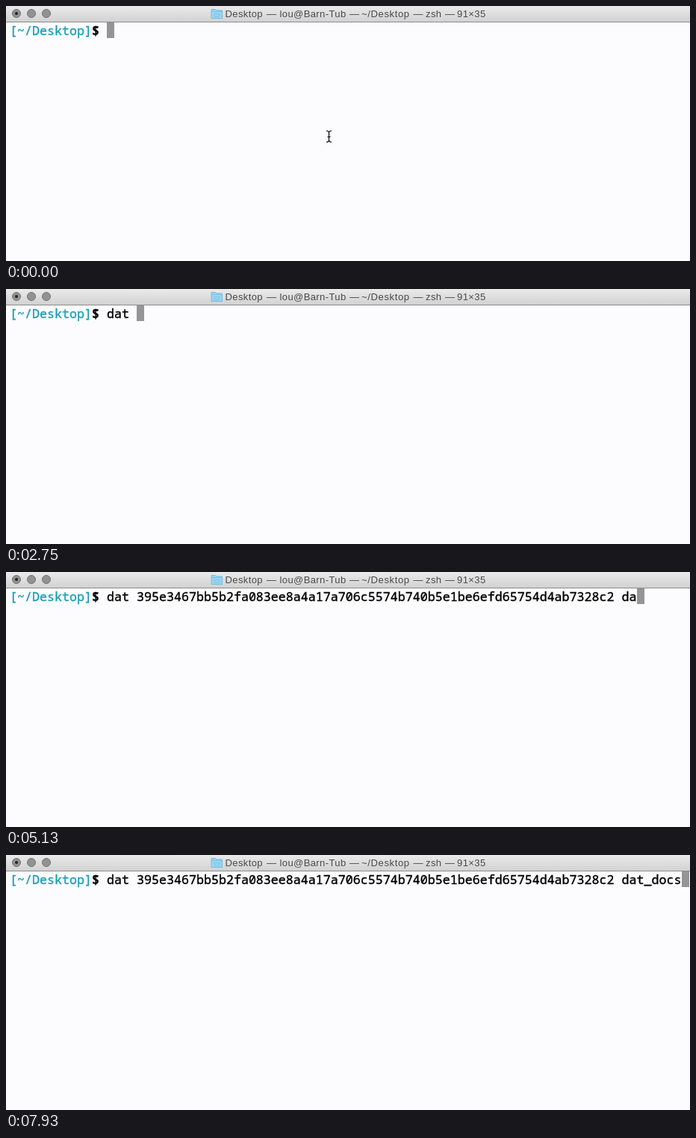
Recreate the animation shown at these times as an HTML page. Size 916 by 342 pixels, loop 8000 ms.

```html
<!DOCTYPE html>
<html lang="en">
<head>
<meta charset="utf-8">
<title>Terminal</title>
<style>
  html, body { margin: 0; width: 100%; height: 100%; overflow: hidden; background: #fcfcfe; }
  svg { display: block; width: 916px; height: 342px; }
  .title { font: 13px "Liberation Sans", Arial, sans-serif; letter-spacing: .4px; fill: #484848; }
  .shell { font: 16.667px "Noto Sans Mono", monospace; white-space: pre; stroke-width: .4; }
  .ink { fill: #000; stroke: #000; }
  .path { fill: #1a9fb6; stroke: #1a9fb6; }
</style>
</head>
<body>
<svg viewBox="0 0 916 342">
  <defs>
    <linearGradient id="bar" x1="0" y1="0" x2="0" y2="1">
      <stop offset="0" stop-color="#eaeaea"/>
      <stop offset="1" stop-color="#d2d2d2"/>
    </linearGradient>
  </defs>
  <rect width="916" height="342" fill="#fcfcfe"/>
  <rect width="916" height="21" fill="url(#bar)"/>
  <rect y="21" width="916" height="1" fill="#8c8c8c"/>

  <g fill="#929292" stroke="#727272">
    <circle cx="14" cy="10" r="5.5"/>
    <circle cx="34" cy="10" r="5.5"/>
    <circle cx="54" cy="10" r="5.5"/>
  </g>
  <circle cx="14" cy="10" r="2" fill="#222"/>

  <path d="M275 16.5V4.5H280.5L282 6H289.500V16.5Z" fill="#9bd6f3" stroke="#72bce0"/>
  <path d="M275.5 7.5H289M279 10.500H286V14H279Z" fill="none" stroke="#7cc3e6"/>

  <g class="title">
    <text x="293.5" y="15">Desktop</text>
    <text x="349" y="15">—</text>
    <text x="366.5" y="15">lou@Barn-Tub</text>
    <text x="460" y="15">—</text>
    <text x="476" y="15" style="letter-spacing:.65px">~/Desktop</text>
    <text x="545.5" y="15">—</text>
    <text x="562" y="15">zsh</text>
    <text x="588" y="15">—</text>
    <text x="604" y="15">91×35</text>
  </g>

  <rect id="caret" y="22" width="10" height="21" fill="#959595"/>
  <g class="shell">
    <text class="path" x="5" y="39">[~/Desktop]</text>
    <text class="ink" x="115" y="39" font-weight="700">$</text>
    <text class="ink" id="typed" x="135" y="39"></text>
  </g>

  <path id="pointer" fill="none" stroke="#000" stroke-width="1.2"
    d="M429 167.5Q432.5 167.5 432.5 170Q432.5 167.5 436 167.5M432.5 169.5V181M429 182.5Q432.5 182.5 432.5 180Q432.5 182.5 436 182.5M430.5 175.5H434.5"/>
</svg>
<script>
  const LOOP = 8000, CELL = 10, START = 135;
  const HASH = "395e3467bb5b2fa083ee8a4a17a706c5574b740b5e1be6efd65754d4ab7328c2";
  // Keystrokes: [time in ms, inserted text]
  const KEYS = [
    [690, "d"], [930, "a"], [1190, "t"], [1430, " "],
    [3030, HASH], [3690, " "],
    [4950, "d"], [5090, "a"], [5250, "t"], [5970, "_"],
    [6530, "d"], [6630, "o"], [6670, "c"], [6770, "s"]
  ];
  const [caret, typed, pointer] = ["caret", "typed", "pointer"].map(id => document.getElementById(id));

  function draw(t) {
    const text = KEYS.filter(([at]) => at <= t).map(([, s]) => s).join("");
    if (typed.textContent !== text) typed.textContent = text;
    caret.setAttribute("x", START + text.length * CELL);
    pointer.setAttribute("visibility", text ? "hidden" : "visible");
  }

  const origin = performance.now();
  function tick() {
    draw((performance.now() - origin) % LOOP);
    requestAnimationFrame(tick);
  }
  draw(0);
  requestAnimationFrame(tick);
</script>
</body>
</html>
```
